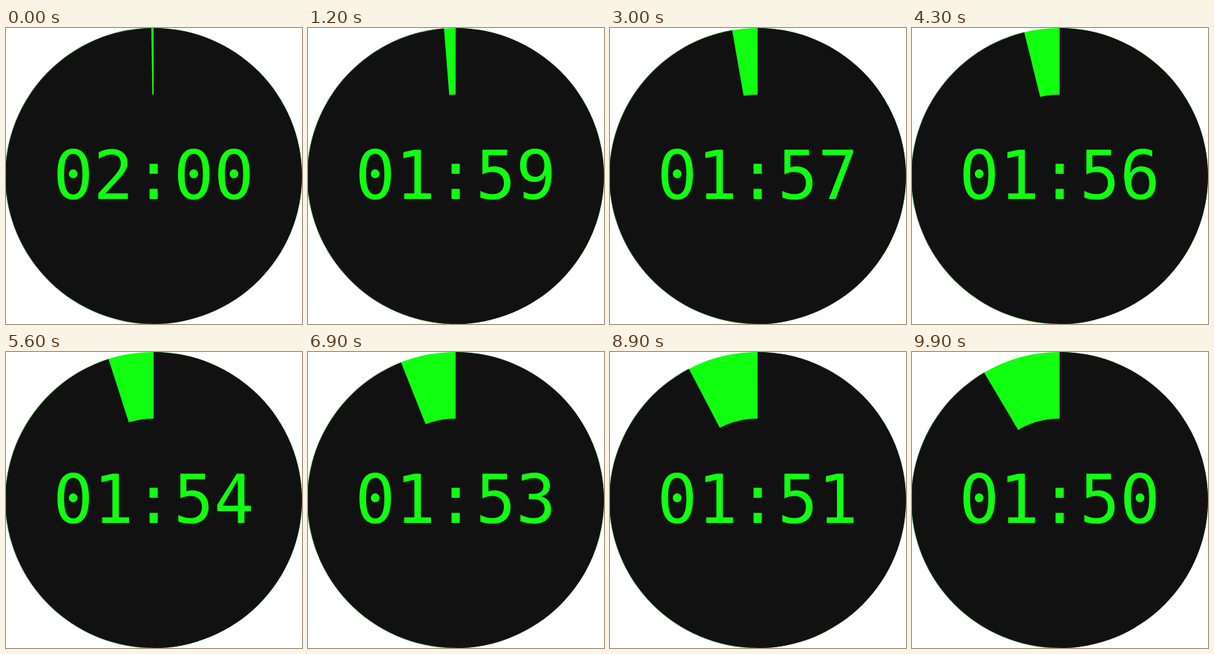
An HTML page without scripts for the animation above (10 s loop, 399 by 400 pixels).

```html
<!DOCTYPE html>
<html lang="en">
<head>
<meta charset="utf-8">
<title>Countdown</title>
<style>
  html, body {
    margin: 0;
    width: 100%;
    height: 100%;
    overflow: hidden;
    background: #fff;
  }
  svg { display: block; }
  .lit { fill: #1f1; }
  .dark { fill: #111; }
  text {
    fill: #1f1;
    font: 90px "DejaVu Sans Mono", monospace;
    text-anchor: middle;
  }
  .cover {
    transform-origin: 199px 200px;
    animation: sweep 10s steps(100) -10ms infinite;
  }
  .digits { animation: tick 10s -10ms infinite; }

  @keyframes sweep {
    from { transform: rotate(-0.9deg); }
    to { transform: rotate(-30.9deg); }
  }
  /* one 120px line per second */
  @keyframes tick {
    0% { transform: translateY(0); animation-timing-function: step-end; }
    4% { transform: translateY(-120px); animation-timing-function: steps(9); }
    94%, 100% { transform: translateY(-1200px); }
  }
</style>
</head>
<body>
<svg width="399" height="400" viewBox="0 0 399 400">
  <circle class="lit" cx="199" cy="200" r="200"/>
  <path class="dark" d="M199 0a200 200 0 0 1 0 400z"/>
  <path class="dark cover" d="M199 0a200 200 0 0 0 0 400z"/>
  <circle class="dark" cx="199" cy="200" r="110"/>
  <svg y="140" width="399" height="120" overflow="hidden">
    <g class="digits">
      <text x="199" y="91">02:00</text>
      <text x="199" y="211">01:59</text>
      <text x="199" y="331">01:58</text>
      <text x="199" y="451">01:57</text>
      <text x="199" y="571">01:56</text>
      <text x="199" y="691">01:55</text>
      <text x="199" y="811">01:54</text>
      <text x="199" y="931">01:53</text>
      <text x="199" y="1051">01:52</text>
      <text x="199" y="1171">01:51</text>
      <text x="199" y="1291">01:50</text>
    </g>
  </svg>
</svg>
</body>
</html>
```
